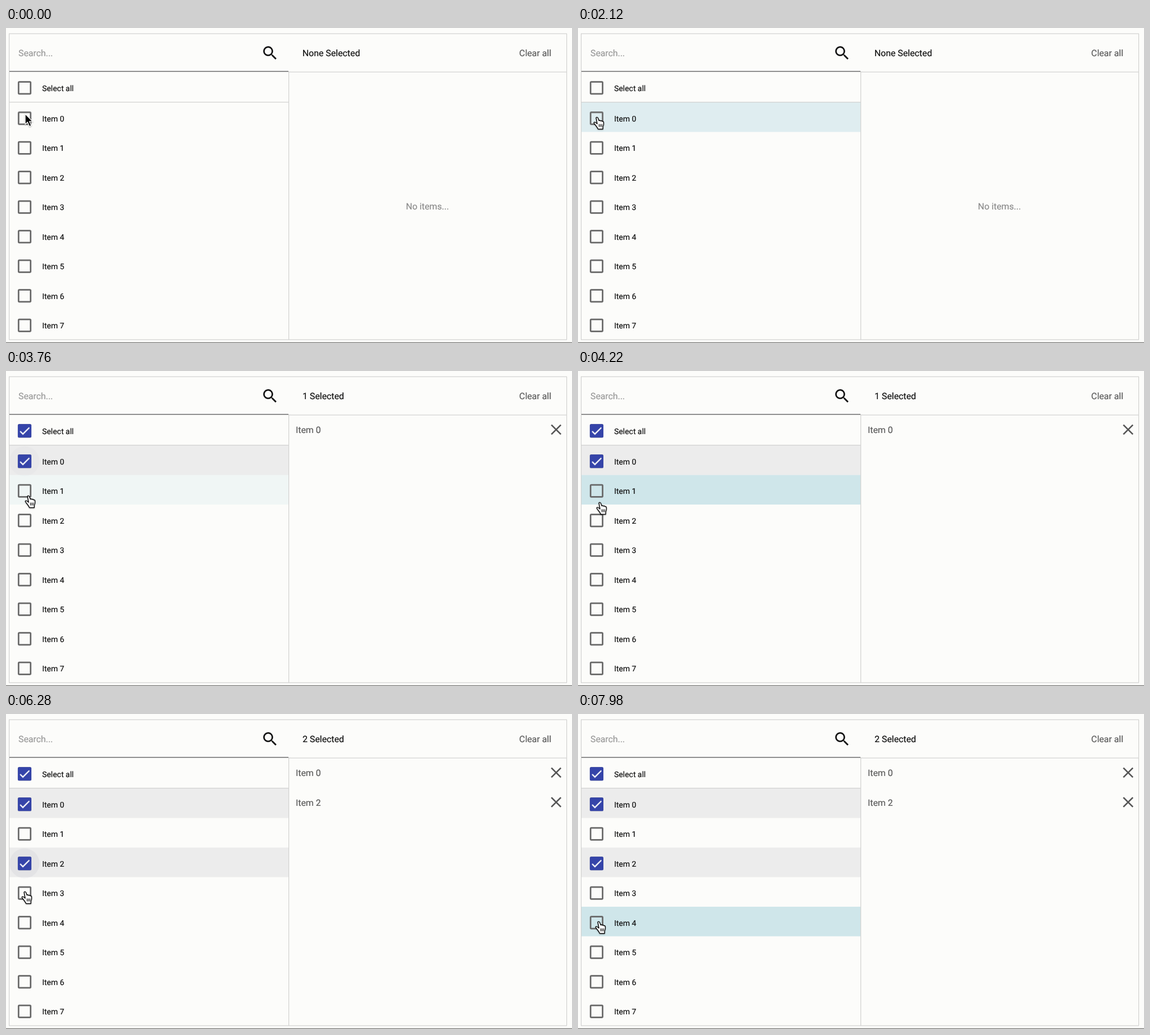
Animation of 1002 by 559 pixels, one loop 8000 ms. Source, as an HTML page:

```html
<!DOCTYPE html>
<html lang="en">
<head>
<meta charset="utf-8">
<title>Multi-select list</title>
<style>
html, body { margin: 0; width: 100%; height: 100%; overflow: hidden; background: #fcfcfa; }
svg { display: block; width: 100vw; height: 100vh; }
text {
  font: 15.8px Roboto, sans-serif;
  color: #111; fill: currentColor; stroke: currentColor; stroke-width: .2px;
  text-rendering: geometricPrecision;
}
.label { font-size: 13.9px; }
.muted { color: #8a8a8a; }
.hint { color: #999; }
.soft { color: #5c5c5c; }
.line { fill: #d2d2d0; }
.box { fill: none; stroke: #686868; stroke-width: 2.7; }
.mark { fill: #3544a9; }
.tick { fill: none; stroke: #fff; stroke-width: 2.2; }
.cross { fill: none; stroke: #555; stroke-width: 2.67; }

.row, .ripple, .first, .second, .none, .one, .arrow, .hand {
  animation: 8s linear infinite;
}
.row { fill: #cfe6ea00; }
.row0 { animation-name: row0; }
.row1 { animation-name: row1; }
.row2 { animation-name: row2; }
.row3 { animation-name: row3; }
.row4 { animation-name: row4; }
@keyframes row0 {
  0%, 22.475% { fill: #cfe6ea00; }
  28.975%, 37% { fill: #cfe6ea; }
  43.5%, 100% { fill: #ececec; }
}
@keyframes row1 {
  0%, 45.19% { fill: #cfe6ea00; }
  51.69%, 53.125% { fill: #cfe6ea; }
  59.625%, 100% { fill: #cfe6ea00; }
}
@keyframes row2 {
  0%, 53.125% { fill: #cfe6ea00; }
  59.625%, 69.75% { fill: #cfe6ea; }
  76.25%, 100% { fill: #ececec; }
}
@keyframes row3 {
  0%, 78.56% { fill: #cfe6ea00; }
  83.69% { fill: #cfe6eac9; }
  88.81%, 100% { fill: #cfe6ea00; }
}
@keyframes row4 {
  0%, 83.69% { fill: #cfe6ea00; }
  90.19%, 100% { fill: #cfe6ea; }
}

.ripple { fill: #282d5a; transform-box: fill-box; transform-origin: center; animation-name: ripple; }
.ripple0 { animation-delay: -5.12s; }
.ripple2 { animation-delay: -2.5s; }
@keyframes ripple {
  0% { opacity: .12; transform: scale(0); animation-timing-function: ease-out; }
  5.6% { opacity: .12; transform: scale(1); }
  11.9%, 100% { opacity: 0; transform: scale(1); }
}

.first { animation-name: first; }
.second { animation-name: second; }
.none { animation-name: none-yet; }
.one { animation-name: one; }
@keyframes first { 0%, 37% { opacity: 0; } 37.8%, 100% { opacity: 1; } }
@keyframes second { 0%, 69.75% { opacity: 0; } 70.25%, 100% { opacity: 1; } }
@keyframes none-yet { 0%, 37% { opacity: 1; } 37.01%, 100% { opacity: 0; } }
@keyframes one {
  0%, 37% { opacity: 0; }
  37.01%, 69.75% { opacity: 1; }
  69.76%, 100% { opacity: 0; }
}

.arrow { animation-name: arrow; filter: drop-shadow(0 1px 1px #0005); }
.hand { animation-name: hand; filter: drop-shadow(0 1px 1px #0004); }
@keyframes arrow { 0%, 22.47% { opacity: 1; } 22.475%, 100% { opacity: 0; } }
@keyframes hand {
  0%, 22.47% { opacity: 0; transform: translate(27px, 157px); }
  22.475%, 44% { opacity: 1; transform: translate(27px, 157px); }
  45.19% { transform: translate(31px, 187px); }
  47% { transform: translate(33px, 220px); }
  48%, 52.3% { transform: translate(33px, 224px); }
  53.125% { transform: translate(31px, 238px); }
  55%, 77.2% { transform: translate(28px, 263px); }
  78.5%, 82% { transform: translate(27px, 314px); }
  83.69% { transform: translate(28px, 342px); }
  85.5% { transform: translate(29px, 351px); }
  89%, 100% { opacity: 1; transform: translate(30px, 367px); }
}
</style>
</head>
<body>
<svg id="stage" viewBox="0 0 1002 559"></svg>
<script>
const text = (x, y, content, cls = '') => `<text x="${x}" y="${y}" class="${cls}">${content}</text>`;
const rect = (x, y, w, h, cls) => `<rect x="${x}" y="${y}" width="${w}" height="${h}" class="${cls}"/>`;

// cls names the animation that checks the box
const checkbox = (y, cls) => `
  <g transform="translate(20.9 ${y - 11.8})">
    <rect x="1.35" y="1.35" width="21.3" height="21.3" rx="1.4" class="box"/>
    ${cls ? `<g class="${cls}">
      <rect width="24" height="24" rx="2.6" class="mark"/>
      <path d="M4.1 12.7 9 17.6 20.3 6.3" class="tick"/></g>` : ''}
  </g>`;

const checkedBy = { 0: 'first', 2: 'second' };
const pitch = 52.5;

const listRow = i => {
  const y = 160 + i * pitch;
  const cls = checkedBy[i];
  return rect(6, 132 + i * pitch, 494, pitch, `row row${i}`)
    + (cls ? `<circle cx="32.8" cy="${y}" r="26.5" class="ripple ripple${i}"/>` : '')
    + checkbox(y, cls)
    + text(64, y + 5.5, `Item ${i}`, 'label');
};

const chosenItem = (slot, name, cls) => `
  <g class="${cls}" transform="translate(0 ${slot * pitch})">
    ${text(513, 110.2, name, 'soft')}
    <path d="M965.5 95.6l16.8 16.8m0-16.8l-16.8 16.8" class="cross"/>
  </g>`;

const frame = [
  rect(5, 9.5, 988, 1.2, 'line'), rect(5, 552.5, 988, 1.2, 'line'),
  rect(5, 10, 1.2, 543, 'line'), rect(992, 10, 1.2, 543, 'line'),
  rect(500, 77, 1.2, 476, 'line'), rect(500, 77.5, 492, 1.2, 'line'),
  rect(6, 131, 494, 1.2, 'line'),
  '<rect x="6" y="76" width="494" height="2" fill="#8f8f8f"/>',
  '<rect y="557.7" width="1002" height="1.3" fill="#7c7c7a"/>'
].join('');

const header = `
  ${text(22, 50, 'Search...', 'hint')}
  <path transform="translate(451.3 28.3) scale(1.35)" fill="#111" d="M15.5 14h-.8l-.3-.3A6.5 6.5 0 1 0 13.7 14.4l.3.3v.8l5 5L20.5 19zM9.5 14a4.5 4.5 0 1 1 0-9 4.5 4.5 0 0 1 0 9z"/>
  ${text(524.8, 50, 'None Selected', 'none')}
  ${text(525, 50, '1 Selected', 'one')}
  ${text(525, 50, '2 Selected', 'second')}
  ${text(908.6, 50, 'Clear all', 'soft')}`;

const pointers = `
  <path class="arrow" d="M34 152.5v18.5l4.2-4 3.2 7.6 3.3-1.4-3.2-7.3h5.6z" fill="#000" stroke="#fff" stroke-width="1.2"/>
  <g class="hand" stroke="#000" stroke-width="1.4" stroke-linejoin="round">
    <path fill="#fff" d="M5.2 3.2C4.6 1.2 7.4.6 8.2 2.6l2 5c.6-1.2 2.4-1 2.8.4.8-1 2.4-.6 2.8.8 1-.6 2.4 0 2.6 1.6.4 2.6 0 5.1-1.2 7.600l-.2 4.500H8.600C7.600 20 5.600 17.500 4.200 15.700 2.600 13.700 1 12 1.200 11c.4-1.400 2.400-1 3.600.2L7 13z"/>
    <path fill="none" stroke-width="1.1" d="M10.300 13.500l.2 5m2.300-5v5m2.500-5l-.2 5"/>
  </g>`;

document.getElementById('stage').innerHTML =
  Array.from({ length: 8 }, (_, i) => listRow(i)).join('')
  + checkbox(106, 'first') + text(64, 111.5, 'Select all', 'label')
  + frame + header
  + text(708, 321.7, 'No items...', 'muted none')
  + chosenItem(0, 'Item 0', 'first')
  + chosenItem(1, 'Item 2', 'second')
  + pointers;
</script>
</body>
</html>
```
